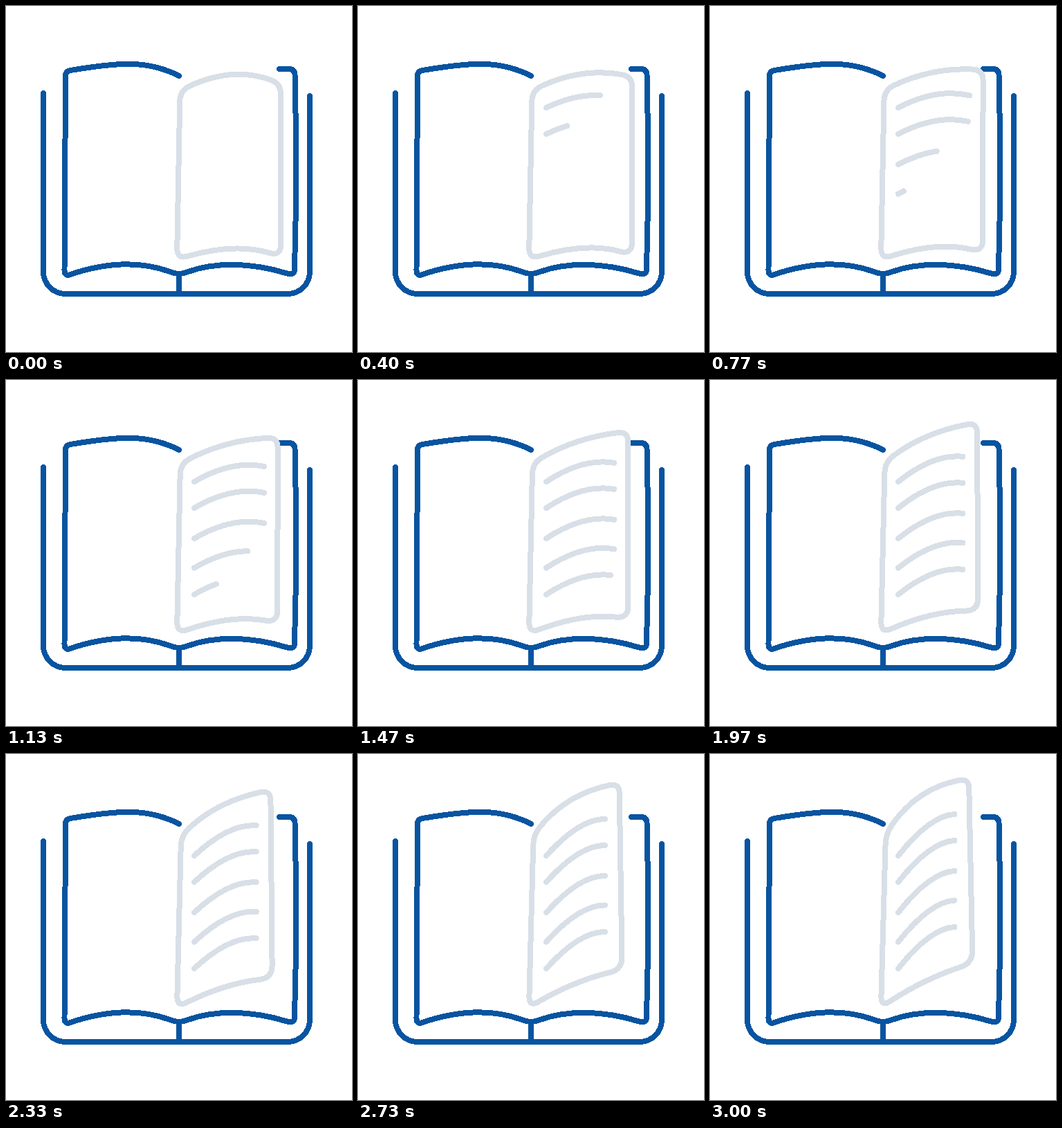
An HTML page that plays this animation: 500x500 px, repeating every 3030 ms.

```html
<!DOCTYPE html>
<html lang="en">
<head>
<meta charset="utf-8">
<title>Open book</title>
<style>
  html, body { margin: 0; width: 100%; height: 100%; overflow: hidden; background: #fff; }
  svg { display: block; width: 100%; height: 100%; }
  path {
    fill: none; stroke-width: 8; stroke-linecap: round; stroke-linejoin: round;
    shape-rendering: crispEdges;
  }
  .book { stroke: #0854a0; }
  .page { stroke: #d8dfe7; }
</style>
</head>
<body>
<svg viewBox="0 0 500 500">
  <path class="book" d="M54 126V384A32 32 0 0 0 86 416H407A32 32 0 0 0 439 384V130M250 387V416"/>
  <path class="book" d="M250 101C205 78 165 81 93 93Q86 94 86 101L84.500 382Q84.500 391 93 388
    C140 372 190 367 237 384Q250 390 263 384C300 371 350 369 408 387Q417 389 417 380
    Q421 240 417.500 99Q417 91 408 91H395"/>
  <path class="page" id="sheet"/>
  <path class="page" id="text"/>
</svg>
<script>
const LOOP = 3030, TURN = 3000;
const LINE_TOPS = [0, 38, 82, 124.5, 163];
const LINE_START = 16, LINE_STEP = 239, LINE_TIME = 530;

const mix = (a, b, k) => a + (b - a) * k;
const between = (a, b, k) => [mix(a[0], b[0], k), mix(a[1], b[1], k)];
const toward = (a, b, r) => between(a, b, r / Math.hypot(b[0] - a[0], b[1] - a[1]));

// Four rounded corners; the top and bottom edges bend around a control point.
// turn runs evenly from 0 to 1, curl speeds up on the way.
function sheetPath(turn, curl) {
  const topLeft = [251.5 + 2.5 * curl, 122 - 7 * curl];
  const topBend = [328 - 28 * turn, 87 + 23 * turn - 60 * turn ** 2];
  const topRight = [397 - 23 * curl, 112 - 77 * turn];
  const bottomRight = [397.5 - 9 * turn - 9 * curl, 362 - 60 * curl];
  const bottomBend = [331 - 23 * curl, 342 - 16 * curl];
  const bottomLeft = [247, 366];
  const corner = (from, at, to, r) => `${toward(at, from, r)}Q${at} ${toward(at, to, r)}`;
  return "M" + corner(bottomLeft, topLeft, topBend, 16)
    + `Q${topBend} ` + corner(topBend, topRight, bottomRight, 15)
    + "L" + corner(topRight, bottomRight, bottomBend, 18)
    + `Q${bottomBend} ` + corner(bottomBend, bottomLeft, topLeft, 16) + "Z";
}

// First part k of a curved text line
function linePath(turn, curl, top, k) {
  if (k <= 0) return "";
  const start = [272, 147 + top];
  const bend = [328 - 10 * curl, 121.5 - 32.5 * curl + top];
  const end = [379.5 - 9 * turn - 17 * curl, 136 - 10 * turn - 39 * curl + top];
  const cut = between(start, bend, k);
  return `M${start}Q${cut} ${between(cut, between(bend, end, k), k)}`;
}

const sheet = document.getElementById("sheet");
const text = document.getElementById("text");

function draw() {
  const time = Math.min(performance.now() % LOOP, TURN);
  const turn = time / TURN;
  const curl = mix(turn, turn ** 2, 0.8);
  sheet.setAttribute("d", sheetPath(turn, curl));
  text.setAttribute("d", LINE_TOPS.map((top, i) =>
    linePath(turn, curl, top, Math.min(1, (time - LINE_START - i * LINE_STEP) / LINE_TIME))).join(""));
  requestAnimationFrame(draw);
}
draw();
</script>
</body>
</html>
```
